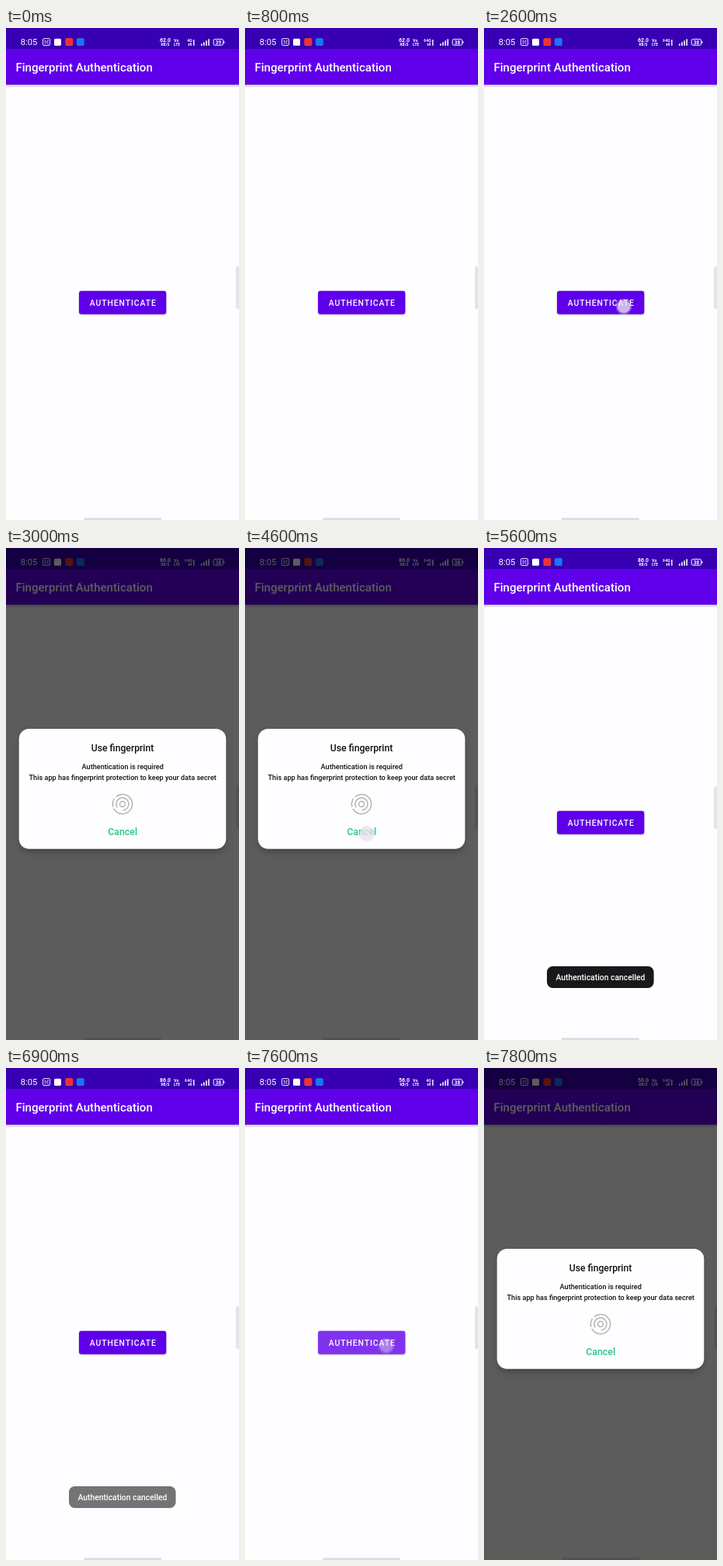
Recreate the animation shown at these times as an HTML page. Size 300 by 634 pixels, loop 8000 ms.

```html
<!DOCTYPE html>
<html lang="en">
<head>
<meta charset="utf-8">
<title>Fingerprint Authentication</title>
<style>
  html, body { margin: 0; width: 100%; height: 100%; overflow: hidden; background: #fefdff; }
  svg { display: block; width: 100%; height: 100%; }
  text { font-family: Roboto, "Noto Sans", sans-serif; font-weight: 500; }
  .mid { text-anchor: middle; }
  .tiny { font-weight: 700; fill: #fff; }
</style>
</head>
<body>
<svg viewBox="0 0 300 634" xmlns="http://www.w3.org/2000/svg">
  <defs>
    <linearGradient id="barShade" x1="0" y1="0" x2="0" y2="1">
      <stop offset="0" stop-color="#000" stop-opacity=".24"/>
      <stop offset="1" stop-color="#000" stop-opacity="0"/>
    </linearGradient>
    <filter id="soft" x="-20%" y="-20%" width="140%" height="150%">
      <feGaussianBlur stdDeviation="1.2"/>
    </filter>
    <filter id="wide" x="-20%" y="-20%" width="140%" height="150%">
      <feGaussianBlur stdDeviation="4"/>
    </filter>
    <clipPath id="buttonClip"><rect x="94" y="338.7" width="112.3" height="30" rx="3"/></clipPath>
  </defs>

  <rect width="300" height="634" fill="#fefdff"/>
  <rect y="73" width="300" height="4" fill="url(#barShade)"/>
  <rect width="300" height="27.5" fill="#3700b3"/>
  <rect y="27" width="300" height="46" fill="#6000ea"/>
  <text x="12.4" y="56" font-size="15.1" fill="#fff">Fingerprint Authentication</text>

  <g id="status">
    <text x="18.8" y="22" font-size="11.2" fill="#fff" style="font-weight:400">8:05</text>
    <g fill="none" stroke="#e4dcf6" stroke-width="1">
      <rect x="47.5" y="13.5" width="9" height="9" rx="1.5"/>
      <path d="M49.5 16h2M53 16h2M49.5 18h5M49.5 20.2h2M53 20.2h2"/>
    </g>
    <rect x="62" y="13.8" width="9" height="9" rx="1.5" fill="#fff"/>
    <rect x="76.3" y="13" width="10" height="10" rx="2" fill="#ea3434"/>
    <rect x="90.8" y="13" width="10" height="10" rx="2.5" fill="#1b74f4"/>
    <text id="speed" class="tiny mid" x="205" y="18" font-size="7"></text>
    <text class="tiny mid" x="205" y="23" font-size="4.8">KB/S</text>
    <text class="tiny" x="216" y="18" font-size="5.4">Vo</text>
    <text class="tiny" x="216" y="23" font-size="5">LTE</text>
    <text class="tiny" x="233.2" y="18.4" font-size="5.2">4G</text>
    <path id="arrows" d="M230 16h3M231.5 14v1M231.5 17v1" stroke="#fff" stroke-width="1"/>
    <path d="M235.5 20v2.7M238 19v3.7M241.8 15v7.7" stroke="#fff" stroke-width="1.4"/>
    <path id="bars" stroke="#fff" stroke-width="1.6"/>
    <rect x="267.2" y="14.4" width="12.4" height="7.8" rx="2" fill="none" stroke="#fff" stroke-width="1"/>
    <path d="M280.9 16.8v3" stroke="#fff" stroke-width="1"/>
    <text id="battery" class="tiny mid" x="273.4" y="20.7" font-size="6.4"></text>
  </g>

  <rect x="94.3" y="340.3" width="111.7" height="29.2" rx="3" fill="#000" opacity=".35" filter="url(#soft)"/>
  <rect x="94" y="338.7" width="112.3" height="30" rx="3" fill="#6000ea"/>
  <g clip-path="url(#buttonClip)"><circle id="ripple" fill="#fff"/></g>
  <text x="107.7" y="358" font-size="10.4" letter-spacing=".93" fill="#fff">AUTHENTICATE</text>

  <rect x="296" y="307" width="6" height="55" rx="2" fill="#e5e3e7"/>
  <rect x="100" y="631.2" width="100" height="4" rx="1.4" fill="#dedce1"/>

  <rect id="dim" width="300" height="634" fill="#000"/>

  <g id="dialog">
    <rect x="18" y="238" width="264" height="154" rx="13" fill="#000" opacity=".25" filter="url(#wide)"/>
    <rect x="16.7" y="233" width="266.6" height="154.8" rx="13" fill="#fefdff"/>
    <g class="mid" fill="#111">
      <text x="150" y="261.8" font-size="12.2">Use fingerprint</text>
      <text x="150.2" y="285.4" font-size="9.15">Authentication is required</text>
      <text x="150.2" y="299.2" font-size="9.13">This app has fingerprint protection to keep your data secret</text>
      <text x="150.2" y="370" font-size="12.3" fill="#27c584">Cancel</text>
    </g>
    <g id="print" fill="none" stroke="#b4b2b6" stroke-width="1.5" stroke-linecap="round"></g>
  </g>

  <g id="toast">
    <rect x="81" y="539" width="137.6" height="28" rx="7.5" fill="#1a181b"/>
    <text class="mid" x="150" y="557.1" font-size="10.35" fill="#fff">Authentication cancelled</text>
  </g>

  <g id="touch">
    <circle r="10.3" fill="#d9d4e2" opacity=".38"/>
    <circle r="8.3" fill="#e9e4f0" opacity=".68"/>
  </g>
</svg>

<script>
const LOOP = 8000, STEP = 100;
const OPENS = [2600, 7400], CANCEL = 4600;
const $ = id => document.getElementById(id);
const clamp = v => Math.max(0, Math.min(1, v));
const set = (id, attrs) => {
  for (const k in attrs) $(id).setAttribute(k, attrs[k]);
};

// Linear interpolation through [time, value] points.
function track(t, points) {
  if (t <= points[0][0]) return points[0][1];
  for (let i = 1; i < points.length; i++) {
    const [t0, v0] = points[i - 1], [t1, v1] = points[i];
    if (t <= t1) return v0 + (v1 - v0) * (t - t0) / (t1 - t0);
  }
  return points[points.length - 1][1];
}

// Arc around the sensor centre, angles in degrees.
function arc(r, from, to) {
  const at = a => {
    const rad = a * Math.PI / 180;
    return `${150 + r * Math.cos(rad)} ${330 + r * Math.sin(rad)}`;
  };
  return `<path d="M${at(from)}A${r} ${r} 0 ${to - from > 180 ? 1 : 0} 1 ${at(to)}"/>`;
}
$('print').innerHTML = arc(12.6, -128, 150) + arc(12.6, 166, 212) +
  arc(8.1, 150, 442) + '<circle cx="150" cy="330" r="3.5"/>';

$('bars').setAttribute('d', [0, 1, 2, 3]
  .map(i => `M${251.8 + i * 3.1} 22.7v${-2.4 - i * 2}`).join(''));

function drawStatus(t) {
  $('speed').textContent = t < 2900 ? '62.0' : t < 7000 ? '86.0' : '56.0';
  $('battery').textContent = t < 800 ? '39' : '38';
  const busy = (t >= 500 && t < 7000) || t >= 7700;
  set('arrows', { opacity: busy ? 1 : 0 });
}

function drawTouch(t, open) {
  const cancelling = t >= CANCEL && t < OPENS[1];
  const age = t - (cancelling ? CANCEL : open);
  const x = cancelling ? 157 : open === OPENS[0] ? 180 : 182;
  const y = cancelling ? 368 : open === OPENS[0] ? 359 : 358;
  const fade = cancelling
    ? track(age, [[0, 1], [100, .5], [200, .06], [300, 0]])
    : track(age, [[0, 1], [100, 1], [200, .55], [300, 0]]);
  set('touch', {
    transform: `translate(${x} ${y})`,
    opacity: age < 0 ? 0 : fade
  });
}

function draw(t) {
  const open = t < OPENS[1] ? OPENS[0] : OPENS[1];
  const age = t - open;
  const shown = track(age, [[200, 0], [300, .5], [400, 1]]);
  const closing = open === OPENS[0] ? t - CANCEL : -1;

  drawStatus(t);
  drawTouch(t, open);
  set('ripple', {
    cx: 180, cy: 358,
    r: 90 * clamp(age / 200),
    opacity: track(age, [[0, 0], [100, .18], [200, .2], [400, 0]])
  });

  set('dim', {
    opacity: .637 * shown * track(closing, [[0, 1], [100, .55], [200, .17], [300, .02], [400, 0]])
  });
  const scale = .95 + .05 * shown;
  set('dialog', {
    opacity: shown * track(closing, [[0, 1], [100, .35], [200, 0]]),
    transform: `translate(150 310) scale(${scale}) translate(-150 -310)`
  });

  set('toast', {
    opacity: track(t, [[4700, 0], [4800, .08], [4900, .35], [5000, .65], [5100, .85],
      [5300, 1], [6700, 1], [7200, 0]])
  });
}

function tick(now) {
  const t = now % LOOP;
  draw(Math.floor(t / STEP) * STEP);
  requestAnimationFrame(tick);
}
draw(0);
requestAnimationFrame(tick);
</script>
</body>
</html>
```
